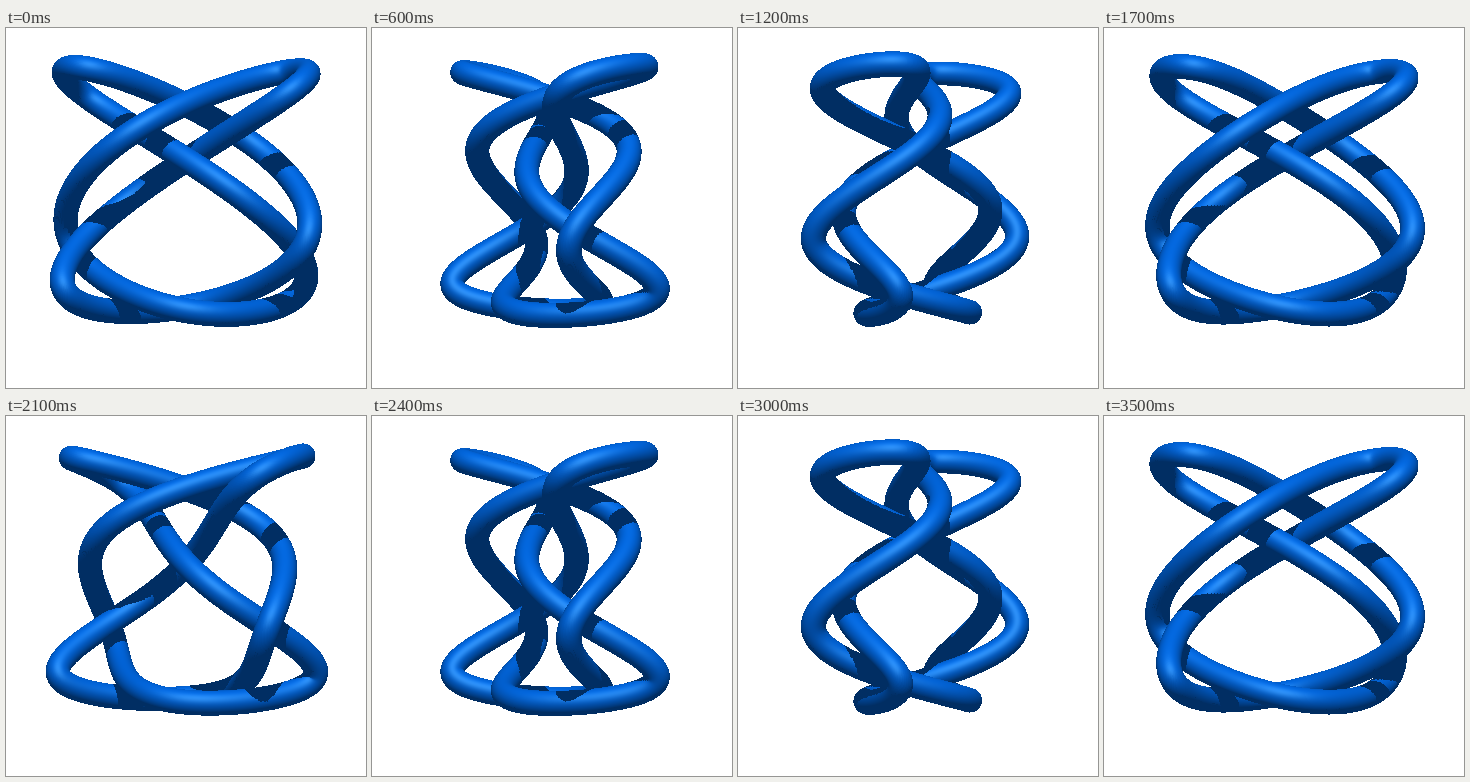
Recreate the animation shown at these times as an HTML page with a canvas. Size 360 by 360 pixels, loop 3600 ms.

```html
<!DOCTYPE html>
<html lang="en">
<head>
<meta charset="utf-8">
<title>Rotating knot</title>
<style>
  html, body { margin: 0; width: 100%; height: 100%; overflow: hidden; background: #fff; }
  canvas { display: block; width: 360px; height: 360px; }
</style>
</head>
<body>
<canvas id="stage" width="360" height="360"></canvas>
<script>
const SIZE = 360, MID_X = 180, MID_Y = 163;
const AMP = 122, DEPTH = 0.4 * AMP, RADIUS = 12.3, EYE = 3000;
const SAMPLES = 2400, STEP_MS = 100, STEPS = 18;   // half a turn looks like a whole one
const LIGHT_MAP = 440, BIAS = 3;
const LIGHT = { y: 0.68, z: 0.733 };
const HALF = normalize(0, LIGHT.y, LIGHT.z + 1);
const BASE = [2, 102, 221], AMBIENT = 0.45, DIFFUSE = 0.58;
const GLOSS = [42, 42, 28], SHINE = 14;

const ctx = document.getElementById('stage').getContext('2d');

function normalize(x, y, z) {
  const len = Math.hypot(x, y, z) || 1;
  return { x: x / len, y: y / len, z: z / len };
}

function turn(x, y, z, angle) {
  const c = Math.cos(angle), s = Math.sin(angle);
  return { x: x * c + z * s, y, z: z * c - x * s };
}

// Lissajous knot with frequencies 3, 2, 7
function knot(angle) {
  return Array.from({ length: SAMPLES }, (_, i) => {
    const t = i / SAMPLES * 2 * Math.PI;
    const p = turn(AMP * Math.cos(3 * t + 0.7), AMP * Math.cos(2 * t + 0.2),
      -DEPTH * Math.cos(7 * t), angle);
    const d = turn(-3 * AMP * Math.sin(3 * t + 0.7), -2 * AMP * Math.sin(2 * t + 0.2),
      7 * DEPTH * Math.sin(7 * t), angle);
    p.tangent = normalize(d.x, d.y, d.z);
    return p;
  });
}

function toScreen(p) {
  const s = EYE / (EYE - p.z);
  return { x: MID_X + p.x * s, y: MID_Y - p.y * s, z: p.z, r: RADIUS * s };
}

function toLight(p) {
  return {
    x: LIGHT_MAP / 2 + p.x,
    y: LIGHT_MAP / 2 - (p.y * LIGHT.z - p.z * LIGHT.y),
    z: p.y * LIGHT.y + p.z * LIGHT.z,
    r: RADIUS
  };
}

// Depth buffer of a row of balls, with the ball that owns each pixel
function raster(balls, size) {
  const depth = new Float32Array(size * size).fill(-1e6);
  const owner = new Int16Array(size * size).fill(-1);
  balls.forEach((b, i) => {
    const rr = b.r * b.r;
    for (let y = Math.floor(b.y - b.r); y <= b.y + b.r; y++) {
      const dy = y + 0.5 - b.y;
      for (let x = Math.floor(b.x - b.r); x <= b.x + b.r; x++) {
        const dx = x + 0.5 - b.x;
        const rest = rr - dx * dx - dy * dy;
        if (rest < 0) continue;
        const z = b.z + Math.sqrt(rest), k = y * size + x;
        if (z > depth[k]) { depth[k] = z; owner[k] = i; }
      }
    }
  });
  return { depth, owner };
}

function render(step) {
  const points = knot(-step * Math.PI / STEPS);
  const balls = points.map(toScreen);
  const { depth, owner } = raster(balls, SIZE);
  const shade = raster(points.map(toLight), LIGHT_MAP).depth;
  const image = ctx.createImageData(SIZE, SIZE);
  const out = image.data.fill(255);

  for (let k = 0; k < owner.length; k++) {
    if (owner[k] < 0) continue;
    const p = points[owner[k]], b = balls[owner[k]], tan = p.tangent;
    const scale = RADIUS / b.r;
    const dx = (k % SIZE + 0.5 - b.x) * scale;
    const dy = (b.y - Math.floor(k / SIZE) - 0.5) * scale;
    const dz = (depth[k] - b.z) * scale;
    const along = dx * tan.x + dy * tan.y + dz * tan.z;
    const n = normalize(dx - along * tan.x, dy - along * tan.y, dz - along * tan.z);

    let lit = Math.max(0, n.y * LIGHT.y + n.z * LIGHT.z);
    let gloss = 0;
    if (lit > 0) {
      const l = toLight({ x: p.x + dx, y: p.y + dy, z: p.z + dz });
      const blocker = shade[Math.floor(l.y) * LIGHT_MAP + Math.floor(l.x)];
      if (blocker > l.z + BIAS) lit = 0;
      else gloss = Math.max(0, n.y * HALF.y + n.z * HALF.z) ** SHINE;
    }
    const level = AMBIENT + DIFFUSE * lit;
    for (let c = 0; c < 3; c++) out[k * 4 + c] = BASE[c] * level + GLOSS[c] * gloss;
  }
  return image;
}

const cache = [];
const start = performance.now();
let shown = -1;

function draw() {
  const step = Math.floor((performance.now() - start) / STEP_MS) % STEPS;
  if (step !== shown) {
    cache[step] = cache[step] || render(step);
    ctx.putImageData(cache[step], 0, 0);
    shown = step;
  }
  requestAnimationFrame(draw);
}
draw();
</script>
</body>
</html>
```
